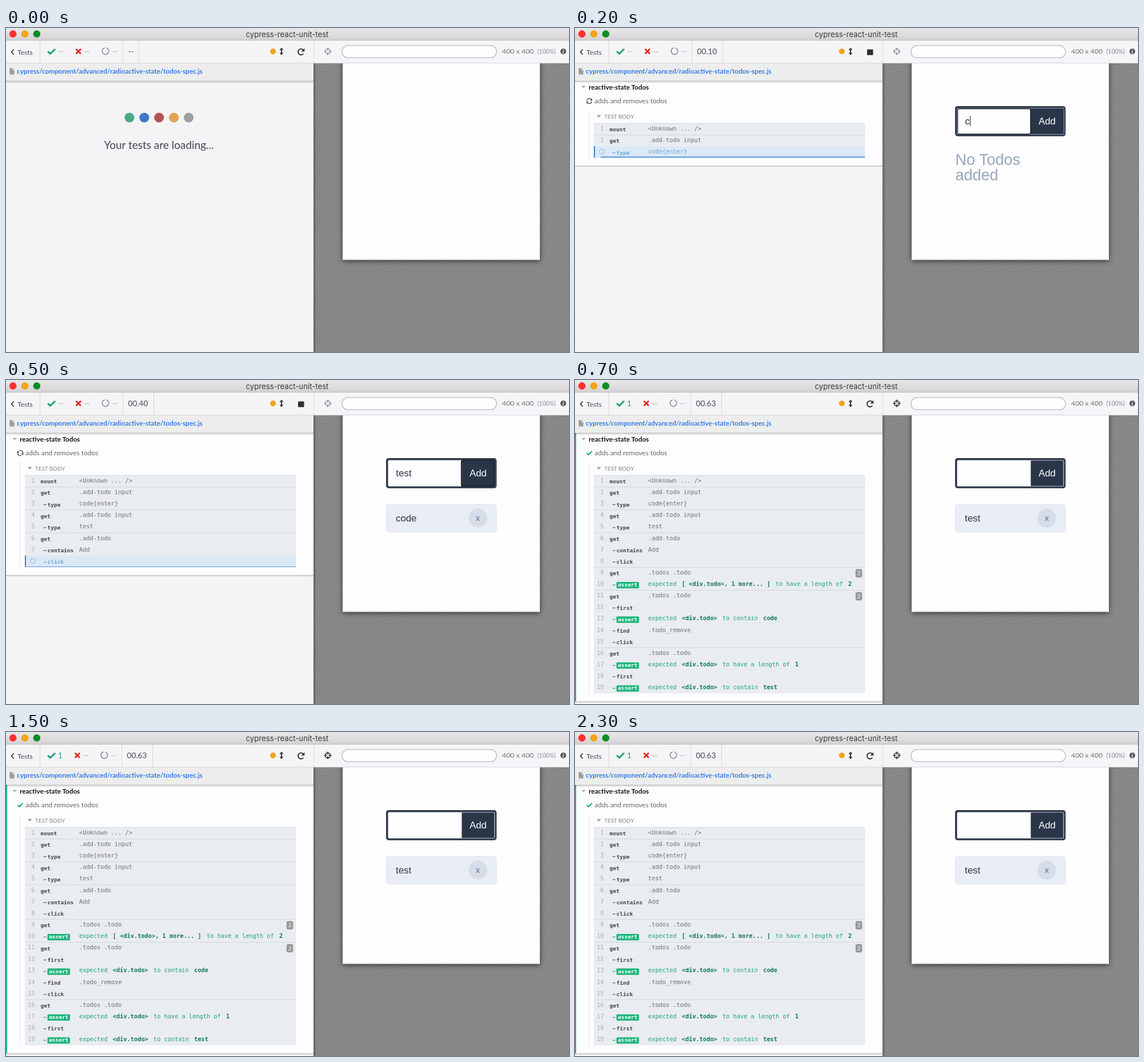
An HTML page that plays this animation: 985x568 px, repeating every 2.4 s.

```html
<!DOCTYPE html>
<html lang="en">
<head>
<meta charset="utf-8">
<title>cypress-react-unit-test</title>
<style>
html, body { margin: 0; width: 100%; height: 100%; overflow: hidden; background: #f4f3f6; }
svg { display: block; width: 985px; height: 568px; }
text { font-family: Lato, "Open Sans", sans-serif; white-space: pre; }
.title { font: 13.2px Inter, sans-serif; fill: #3c3c3c; text-anchor: middle; }
.mono { font: 10.3px "DejaVu Sans Mono", monospace; fill: #6d7177; }
.num { fill: #a9afb8; text-anchor: end; }
.name { font-size: 9.5px; font-weight: 700; fill: #40444a; }
.pass { fill: #1da774; }
.pass .b { font-weight: 700; fill: #107b50; }
.badge { font-size: 9.5px; fill: #fff; text-anchor: middle; }
.running .mono { fill: #6ba3df; }
.app text { font: 16.8px "Liberation Sans", Arial, sans-serif; fill: #2d3748; }
.app .empty { font-size: 27px; fill: #97a8b9; }
.app .add { fill: #fff; text-anchor: middle; }
.app .close { font-size: 15px; fill: #5c708d; text-anchor: middle; }
.line { fill: none; stroke-linecap: butt; }
.hide { display: none; }
</style>
</head>
<body>
<svg viewBox="0 0 985 568">
  <defs>
    <linearGradient id="bar" x2="0" y2="1">
      <stop stop-color="#e9e7e9"/><stop offset="1" stop-color="#d3d1d3"/>
    </linearGradient>
    <linearGradient id="fade" x2="0" y2="1">
      <stop stop-color="#000" stop-opacity=".26"/><stop offset="1" stop-color="#000" stop-opacity="0"/>
    </linearGradient>
    <linearGradient id="side">
      <stop stop-color="#000" stop-opacity=".3"/><stop offset="1" stop-color="#000" stop-opacity="0"/>
    </linearGradient>
    <pattern id="stripes" width="4.250" height="4.250" patternUnits="userSpaceOnUse" patternTransform="rotate(45)">
      <rect width="4.250" height="4.250" fill="#8d8d8e"/><rect width="1.800" height="4.250" fill="#7f7f80"/>
    </pattern>
  </defs>

  <!-- reporter -->
  <rect width="985" height="568" fill="#f4f3f6"/>
  <g id="loading">
    <g id="dots"></g>
    <text x="267.5" y="212" font-size="19" fill="#45454a" text-anchor="middle">Your tests are loading...</text>
  </g>
  <g id="suite">
    <rect id="panelEdge" y="93" width="538" fill="#c4c3c6"/>
    <rect id="panel" y="93" width="538" fill="#fdfdff"/>
    <rect id="passEdge" y="93" width="2" fill="#1fb57c"/>
    <path d="M11 101.500h8l-4 4.500z" fill="#b4b4b6"/>
    <text x="24" y="108" font-size="11.700" font-weight="700" fill="#111">reactive-state Todos</text>
    <g id="spin" fill="#444">
      <path class="line" d="M-4.400-1A4.500 4.500 0 0 1 3.500-2.800M4.400 1A4.500 4.500 0 0 1-3.500 2.800" stroke="#444" stroke-width="1.300"/>
      <path d="M4.900-4.400v3.600H1.300zM-4.900 4.400V.8H-1.300z"/>
    </g>
    <path id="tick" class="line" d="M20.500 128l3 3 6-6" stroke="#1fa971" stroke-width="2.200"/>
    <text x="34" y="132" font-size="12" fill="#67676c">adds and removes todos</text>
    <path id="guide" class="line" stroke="#d2d2d6" stroke-dasharray="1 1"/>
    <path d="M37.500 152.500h8.500l-4.250 4.500z" fill="#a2a2a6"/>
    <text x="51" y="158.500" font-size="9.850" fill="#85858a">TEST BODY</text>
    <g id="rows"></g>
  </g>
  <rect y="92" width="538" height="5" fill="url(#fade)"/>
  <rect y="62" width="538" height="30.500" fill="#ededee"/>
  <path d="M6.500 70.500h5l3 3v8h-8z" fill="#9a9a9c"/><path d="M11.500 70.500v3h3" class="line" stroke="#ededee"/>
  <text x="19" y="80" font-size="11.800" font-weight="600" fill="#1a6fe3">cypress/component/advanced/radioactive-state/todos-spec.js</text>

  <!-- preview -->
  <rect x="538" y="62" width="447" height="506" fill="url(#stripes)"/>
  <rect x="538" y="62" width="5" height="506" fill="url(#side)"/>
  <rect x="589" y="50" width="345" height="356.500" fill="#fefdff" style="filter:drop-shadow(0 2px 5px #0009)"/>
  <g class="app" id="app">
    <rect x="665" y="137" width="193.300" height="52.800" rx="4.500" fill="#2a3548"/>
    <rect x="668.400" y="140.400" width="186.900" height="46.200" rx="1.500" fill="#fefdff"/>
    <rect x="797.400" y="141.200" width="57" height="44.600" fill="#2a3548"/>
    <g id="inputFocus">
      <rect x="797" y="140" width="59" height="47" fill="#2a3548"/>
      <path class="line" d="M797 140.500h58.500v46H797" stroke="#c5cad2" stroke-width=".7"/>
      <rect x="669.500" y="141.500" width="127.500" height="44.500" rx="2.500" class="line" stroke="#151a24" stroke-width="1.300"/>
    </g>
    <rect id="addFocus" x="796.700" y="141" width="57.600" height="45" rx="2" class="line" stroke="#0b0e14" stroke-width="1.600"/>
    <text class="add" x="826" y="169">Add</text>
    <text id="field" x="682.300" y="169"></text>
    <rect id="caret" y="154" width="1" height="18" fill="#222"/>
    <g id="empty">
      <text class="empty" x="665.500" y="240">No Todos</text>
      <text class="empty" x="665.500" y="267">added</text>
    </g>
    <g id="todos"></g>
  </g>

  <!-- toolbar -->
  <rect y="22" width="985" height="40" fill="#f5f4f7"/>
  <path d="M0 61.500h985" stroke="#d6d5d8"/>
  <path d="M59.500 22v39M538.500 22v40" stroke="#d8d7da"/>
  <path d="M13.500 37.500l-4 4.500 4 4.500" class="line" stroke="#333" stroke-width="1.800"/>
  <text x="20" y="46.500" font-size="12" fill="#4a4a4e">Tests</text>
  <path d="M73 41l4.500 4.200 8.500-8.500" class="line" stroke="#1fa173" stroke-width="3"/>
  <text id="passed" x="91" y="45.500" font-size="13.500"></text>
  <g id="stats">
    <path d="M122.500 36.800l8.500 8.500m0-8.500l-8.500 8.500" class="line" stroke="#e02b25" stroke-width="2.800"/>
    <text x="136" y="45.500" font-size="13.500" fill="#c98080">--</text>
    <circle cx="174" cy="40.500" r="5.800" class="line" stroke="#8e8e92" stroke-width="1.700" stroke-dasharray="32 4.440" transform="rotate(-70 174 40.500)"/>
    <text x="185.500" y="45.500" font-size="13.500" fill="#a9a9ad">--</text>
    <path id="divider" d="M204.500 22v39" stroke="#d8d7da"/>
    <path id="timeEdge" stroke="#d8d7da"/>
    <text id="time" x="213.500" y="45.500" font-size="13.700" fill="#4a4a4e"></text>
  </g>
  <circle cx="467" cy="41" r="5" fill="#f5a31d"/>
  <path d="M482 37v8" stroke="#333" stroke-width="2"/>
  <path d="M478.500 38.500l3.500-4 3.500 4zm0 5l3.500 4 3.500-4z" fill="#333"/>
  <g id="reload">
    <path d="M520.300 45A5.200 5.200 0 1 1 520 38.300" class="line" stroke="#333" stroke-width="1.900"/>
    <path d="M522.300 35.500v5.800h-5.800z" fill="#333"/>
  </g>
  <rect id="stop" x="511" y="37.500" width="10.500" height="10" rx="1" fill="#2e2e30"/>
  <path id="target" d="M558.500 41a4.500 4.500 0 1 0 9 0a4.500 4.500 0 1 0-9 0M563 34.500v5M563 42.500v5M556.500 41h5M564.500 41h5" class="line"/>
  <rect x="587.800" y="30.700" width="270.400" height="21.600" rx="10.800" fill="#fefdff" stroke="#c6c5c9" stroke-width="1.500"/>
  <text x="868" y="45" font-size="12.300" fill="#77777b">400 x 400</text>
  <text x="929.5" y="45" font-size="10.500" fill="#8b8b8f">(100%)</text>
  <circle cx="975" cy="41" r="5" fill="#555559"/>
  <path d="M975 37.500v1.600M975 40.200v4" stroke="#fff" stroke-width="1.600"/>

  <!-- window bar -->
  <rect width="985" height="22" fill="url(#bar)"/>
  <path d="M0 21.500h985" stroke="#bcbabc"/>
  <g id="lights"></g>
  <text class="title" x="492" y="15.500">cypress-react-unit-test</text>
</svg>
<script>
const $ = id => document.getElementById(id);
const show = (id, on) => $(id).classList.toggle('hide', !on);
const set = (id, name, value) => $(id).setAttribute(name, value);

const TOP = 167, PITCH = 20.12;

// name, message (*bold*), match count; a leading "-" marks a child command
const COMMANDS = [
  ['mount', '<Unknown ... />'],
  ['get', '.add-todo input'],
  ['-type', 'code{enter}'],
  ['get', '.add-todo input'],
  ['-type', 'test'],
  ['get', '.add-todo'],
  ['-contains', 'Add'],
  ['-click', ''],
  ['get', '.todos .todo', 2],
  ['-assert', 'expected *[ <div.todo>, 1 more... ]* to have a length of *2*'],
  ['get', '.todos .todo', 2],
  ['-first', ''],
  ['-assert', 'expected *<div.todo>* to contain *code*'],
  ['-find', '.todo_remove'],
  ['-click', ''],
  ['get', '.todos .todo'],
  ['-assert', 'expected *<div.todo>* to have a length of *1*'],
  ['-first', ''],
  ['-assert', 'expected *<div.todo>* to contain *test*']
];

// One state per 100 ms; the last one holds until the loop restarts
const STATES = [
  { rows: 0, time: '--' },
  { rows: 1, time: '00.00' },
  { rows: 3, time: '00.10', field: 'c', todos: [], focus: 'input' },
  { rows: 5, time: '00.20', field: '', todos: ['code'], focus: 'input' },
  { rows: 5, time: '00.30', field: 'test', todos: ['code'], focus: 'input' },
  { rows: 8, time: '00.40', field: 'test', todos: ['code'], focus: 'add' },
  { rows: 15, time: '00.50', field: '', todos: ['code', 'test'], focus: 'add' },
  { rows: 19, time: '00.63', field: '', todos: ['test'], done: true }
];

const esc = s => s.replace(/</g, '&lt;').replace(/>/g, '&gt;');

function message(text) {
  return text.split('*').map((part, i) =>
    `<tspan${i ? ' dx="3"' : ''}${i % 2 ? ' class="b"' : ''}>${esc(part)}</tspan>`).join('');
}

function row([name, text, count], i, running, step) {
  const y = TOP + i * PITCH, child = name[0] === '-', assert = name === '-assert';
  const label = child ? name.slice(1) : name;
  const base = y + 14.3;
  let out = `<rect x="33" y="${y}" width="474.500" height="${PITCH + .1}" fill="${running ? '#dbe8f6' : '#e9ecf0'}"/>`;
  if (!child) out += `<path d="M33 ${y + .4}h474.500" stroke="#d3d8dd"/>`;
  if (running) {
    const thick = i < 4 ? 2 : 1;
    out += `<path d="M34 ${y}v${PITCH}" stroke="#3a7fc6" stroke-width="2"/>
      <rect x="${i < 4 ? 45 : 36}" y="${y + PITCH - thick}" width="${i < 4 ? 462 : 471}" height="${thick}" fill="#5596dd"/>
      <circle cx="47" cy="${y + 9.5}" r="4.300" class="line" stroke="#6ba3df" stroke-width="1.600"
        stroke-dasharray="1.300 2.077" transform="rotate(${step * 45} 47 ${y + 9.5})"/>`;
  } else {
    out += `<text class="mono num" x="50.500" y="${y + 13}">${i + 1}</text>`;
  }
  if (child) out += `<path d="M65.500 ${y + 11.3}h5" stroke="${running ? '#6ba3df' : assert ? '#1da774' : '#55595f'}" stroke-width="1.200"/>`;
  if (assert) {
    out += `<rect x="72.500" y="${y + 6}" width="39.500" height="11.200" rx="1.500" fill="#1bb57c"/>
      <text class="mono name" x="75" y="${base}" style="fill:#fff">${label}</text>`;
  } else {
    out += `<text class="mono name" x="${child ? 72.5 : 60.5}" y="${base}">${label}</text>`;
  }
  out += `<text class="mono${assert ? ' pass' : ''}" x="128" y="${y + 13}">${message(text)}</text>`;
  if (count) {
    out += `<rect x="490.800" y="${y + 3.6}" width="11.500" height="14.800" rx="3" fill="#98989b"/>
      <text class="mono badge" x="496.500" y="${y + 14.5}">${count}</text>`;
  }
  return `<g class="${running ? 'running' : ''}">${out}</g>`;
}

const todo = (name, i) => `<g transform="translate(0 ${i * 58})">
  <rect x="665.500" y="218" width="192.500" height="48.500" rx="5" fill="#e9edf5" stroke="#dde2ea"/>
  <text x="682" y="247.700">${name}</text>
  <circle cx="825.500" cy="242" r="16.500" fill="#d5dde9"/>
  <text class="close" x="825.500" y="247">x</text></g>`;

const circles = (colors, x, gap, y, r) => colors.map((c, i) =>
  `<circle cx="${x + i * gap}" cy="${y}" r="${r}" fill="${c}"/>`).join('');

function render(step) {
  const { rows, time, field = '', todos, focus, done = false } = STATES[step];
  const end = TOP + rows * PITCH, height = end + 15 - 93;
  show('loading', !rows);
  show('suite', rows);
  set('panel', 'height', height - 1);
  set('panelEdge', 'height', height + .7);
  set('passEdge', 'height', height - 1);
  set('guide', 'd', `M24.500 145V${end}`);
  set('spin', 'transform', `translate(25 128) rotate(${(step - 2) * 18})`);
  show('passEdge', done);
  show('tick', done);
  show('spin', !done);
  $('rows').innerHTML = COMMANDS.slice(0, rows).map((command, i) =>
    row(command, i, !done && i === rows - 1, step)).join('');

  $('passed').textContent = done ? '1' : '--';
  set('passed', 'fill', done ? '#1fa173' : '#7db8a0');
  set('stats', 'transform', `translate(${done ? -2 : 0} 0)`);
  $('time').textContent = time;
  set('timeEdge', 'd', `M${rows ? 258.5 : 232.5} 22v39`);
  show('stop', rows && !done);
  show('reload', !rows || done);
  set('target', 'stroke', done ? '#333' : '#77777b');
  set('target', 'stroke-width', done ? 1.7 : 1.2);

  show('app', todos);
  show('inputFocus', focus === 'input');
  show('addFocus', focus === 'add');
  $('field').textContent = field;
  show('caret', focus === 'input');
  set('caret', 'x', 682.5 + $('field').getComputedTextLength());
  show('empty', todos && !todos.length);
  $('todos').innerHTML = (todos || []).map(todo).join('');
}

$('dots').innerHTML = circles(['#4aab85', '#3f78c9', '#b4524f', '#e1a455', '#9f9fa0'], 216, 25.9, 157, 8.6);
$('lights').innerHTML = circles(['#fb302b', '#f4a411', '#0b8f21'], 12.2, 20.8, 10.4, 6.3);

let current = -1;
function tick() {
  const step = Math.min(Math.floor(performance.now() % 2400 / 100), STATES.length - 1);
  if (step !== current) render(current = step);
  requestAnimationFrame(tick);
}
tick();
</script>
</body>
</html>
```
